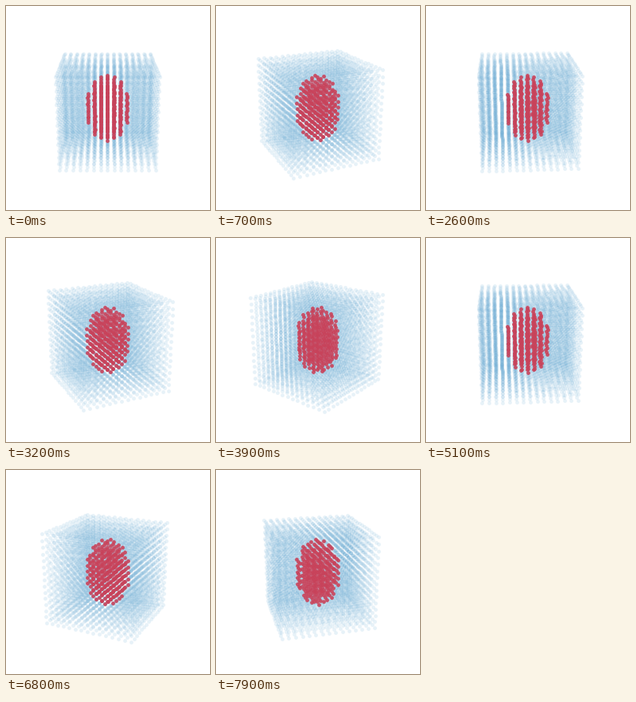
A matplotlib script that plays this animation: 256x256 px, repeating every 8000 ms.

```python
import numpy as np
import matplotlib.pyplot as plt
from matplotlib.animation import FuncAnimation

SIZE, DPI = 256, 100
FRAMES, INTERVAL = 80, 100
STEP = np.radians(3.6)
ELEV = np.radians(20)
CENTER = np.array([127.2, 128.2])
HALF = 0.103   # half edge of the cube, in camera distances
FOCAL = 551    # pixels

axis = np.linspace(-1, 1, 15)
grid = np.stack(np.meshgrid(axis, axis, axis), -1).reshape(-1, 3)
inside = (grid**2 / np.array([0.5, 0.5, 0.75])**2).sum(1) <= 1
core, shell = grid[inside], grid[~inside]


def project(points, angle):
    """Pixel positions of the rotated points, farthest first."""
    x, y, z = HALF * points.T
    side = x * np.cos(angle) - y * np.sin(angle)
    back = x * np.sin(angle) + y * np.cos(angle)
    up = z * np.cos(ELEV) + back * np.sin(ELEV)
    depth = 1 + back * np.cos(ELEV) - z * np.sin(ELEV)
    pixels = CENTER + FOCAL * np.column_stack([side, -up]) / depth[:, None]
    return pixels[np.argsort(-depth)]


fig = plt.figure(figsize=(SIZE / DPI, SIZE / DPI), dpi=DPI, facecolor="white")
ax = fig.add_axes([0, 0, 1, 1])
ax.set(xlim=(0, SIZE), ylim=(SIZE, 0))
ax.axis("off")


def cloud(points, color, alpha):
    return ax.scatter(*project(points, 0).T, s=12, c=color, alpha=alpha,
                      linewidths=0)


clouds = [(shell, cloud(shell, "#5ba3d0", 0.14)),
          (core, cloud(core, "#c8425a", 0.9))]


def update(i):
    for points, dots in clouds:
        dots.set_offsets(project(points, i * STEP))
    return [dots for _, dots in clouds]


anim = FuncAnimation(fig, update, frames=FRAMES, interval=INTERVAL,
                     repeat=True, repeat_delay=0, blit=False)
plt.show()
```
